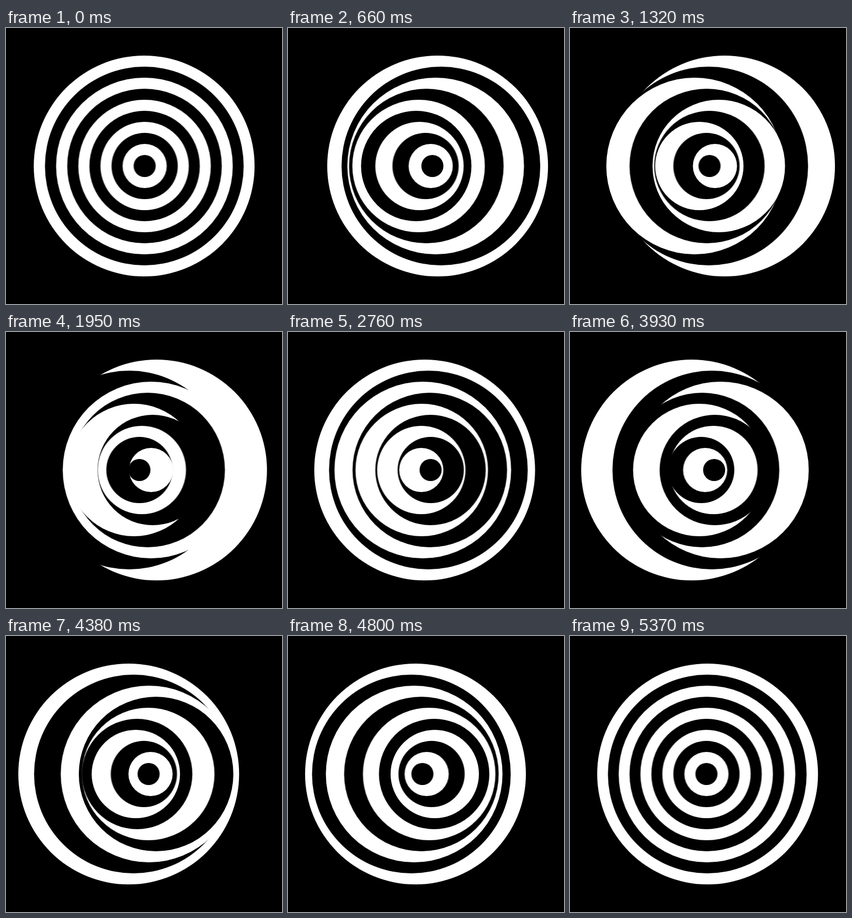
Animation, 500 px wide and 500 px high, one loop 5.4 s. Source, as an HTML page with a canvas:

```html
<!DOCTYPE html>
<html lang="en">
<head>
<meta charset="utf-8">
<title>Swaying rings</title>
<style>
  html, body { margin: 0; width: 100%; height: 100%; overflow: hidden; background: #000; }
  canvas { display: block; }
</style>
</head>
<body>
<canvas id="stage" width="500" height="500"></canvas>
<script>
const SIZE = 500, MID = SIZE / 2;
const STEPS = 180, STEP_MS = 30;
const DISCS = 10;
const SAMPLES = 5, SHUTTER = 0.6;

const view = document.getElementById('stage').getContext('2d');
const layer = document.createElement('canvas');
layer.width = layer.height = SIZE;
const pen = layer.getContext('2d');

// Each smaller disc sways one harmonic faster, with 90% of the swing.
function drawDiscs(phase) {
  pen.fillStyle = '#000';
  pen.fillRect(0, 0, SIZE, SIZE);
  for (let i = 0; i < DISCS; i++) {
    const x = MID + 30 * 0.9 ** i * Math.sin((i + 1) * phase);
    pen.fillStyle = i % 2 ? '#000' : '#fff';
    pen.beginPath();
    pen.arc(x, MID, 200 - 20 * i, 0, 2 * Math.PI);
    pen.fill();
  }
}

// Average several moments of the open shutter for motion blur.
function drawStep(step) {
  view.globalCompositeOperation = 'source-over';
  view.globalAlpha = 1;
  view.fillStyle = '#000';
  view.fillRect(0, 0, SIZE, SIZE);
  view.globalCompositeOperation = 'lighter';
  view.globalAlpha = 1 / SAMPLES;
  for (let s = 0; s < SAMPLES; s++) {
    const moment = step + (s + 0.5) * SHUTTER / SAMPLES;
    drawDiscs(2 * Math.PI * moment / STEPS);
    view.drawImage(layer, 0, 0);
  }
}

const start = performance.now();
let shown = -1;

function tick() {
  const step = Math.floor((performance.now() - start) / STEP_MS) % STEPS;
  if (step !== shown) drawStep(shown = step);
  requestAnimationFrame(tick);
}
tick();
</script>
</body>
</html>
```
